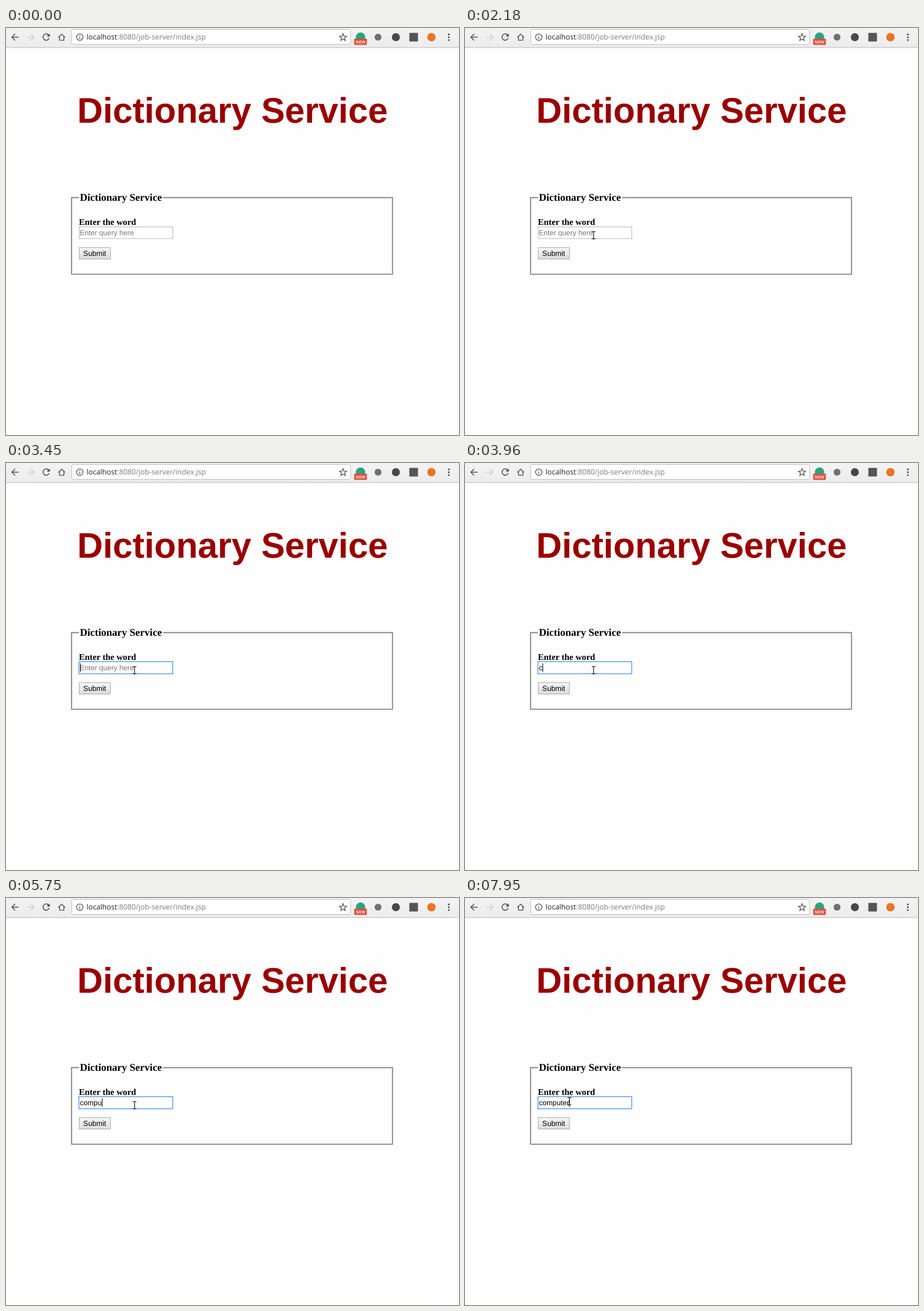
Write an HTML page that moves like this. It is 789 by 709 pixels and loops after 8000 ms.

```html
<!DOCTYPE html>
<html lang="en">
<head>
<meta charset="utf-8">
<title>Dictionary Service</title>
<style>
  html, body { margin: 0; width: 100%; height: 100%; overflow: hidden; background: #fefefe; }
  svg { display: block; }
  text { text-rendering: geometricPrecision; white-space: pre; }
  .sans { font-family: "Liberation Sans", Arial, sans-serif; }
  .serif { font-family: "Liberation Serif", "Times New Roman", serif; font-weight: bold; }
  .ui { font-family: "Open Sans", sans-serif; }
  .field { font-size: 12.66px; }
  .icon { fill: none; stroke: #505050; stroke-width: 1.6; }
</style>
</head>
<body>
<svg width="789" height="709" viewBox="0 0 789 709">
  <defs>
    <linearGradient id="bar" x2="0" y2="1">
      <stop stop-color="#f3f3f3"/><stop offset="1" stop-color="#ececec"/>
    </linearGradient>
    <linearGradient id="face" x2="0" y2="1">
      <stop stop-color="#f6f6f6"/><stop offset="1" stop-color="#dcdcdc"/>
    </linearGradient>
  </defs>

  <!-- browser toolbar -->
  <rect width="789" height="34" fill="url(#bar)"/>
  <rect y="33.5" width="789" height="1" fill="#b8b8b8"/>
  <g class="icon">
    <path d="M22 16H10.5M16 10.2L10.2 16L16 21.8"/>
    <path d="M37 16H48.5M43 10.2L48.8 16L43 21.8" stroke="#cfcfcf" style="stroke:#cfcfcf"/>
    <path d="M74.6 12.8A5.5 5.5 0 1 0 75.2 17.6"/>
    <path d="M76.4 9.6V14.9H71.1Z" style="fill:#505050;stroke:none"/>
    <path d="M91 16.6L97 10.8L103 16.6M93.3 15V21.4H100.7V15" stroke-width="1.4"/>
  </g>
  <rect x="114.5" y="2.5" width="485.500" height="26" rx="2.500" fill="#fff" stroke="#bdbdbd"/>
  <g class="icon" style="stroke-width:1.3">
    <circle cx="128.500" cy="16" r="5.600"/>
    <path d="M128.500 15.200V19.200M128.500 12.700V14.100"/>
    <path id="star"/>
  </g>
  <text class="ui" x="140.300" y="20.300" font-size="12.720" fill="#222">localhost<tspan fill="#7b7b7b">:8080/job-server/index.jsp</tspan></text>

  <!-- extension buttons -->
  <circle cx="617.500" cy="16" r="8.200" fill="#27a57f"/>
  <rect x="606.500" y="18.500" width="22" height="11" rx="1" fill="#dd4f3c"/>
  <text class="ui" x="617.500" y="26.800" font-size="7.200" font-weight="600" fill="#fff" text-anchor="middle">NEW</text>
  <circle cx="648" cy="16" r="6" fill="#707070"/>
  <circle cx="679" cy="16" r="7" fill="#484848"/>
  <rect x="702.500" y="8.500" width="15" height="15" rx="1" fill="#555"/>
  <circle cx="741" cy="16" r="7.300" fill="#ea7423"/>
  <g fill="#505050">
    <circle cx="771.300" cy="11.200" r="1.600"/>
    <circle cx="771.300" cy="16.100" r="1.600"/>
    <circle cx="771.300" cy="21" r="1.600"/>
  </g>

  <!-- page -->
  <text class="sans" x="394.500" y="165" font-size="62" font-weight="bold" fill="#990000" text-anchor="middle">Dictionary Service</text>
  <path d="M127 295.500H114.200V428.900H673.200V295.500H273.500" fill="none" stroke="#858585" stroke-width="1.900"/>
  <text class="serif" x="128.700" y="301" font-size="18.050">Dictionary Service</text>
  <text class="serif" x="127" y="342.500" font-size="15.380">Enter the word</text>
  <rect id="input" fill="#fff"/>
  <text id="hint" class="sans field" x="128.500" y="361" fill="#777">Enter query here</text>
  <text id="typed" class="sans field" x="128.700" y="361"></text>
  <rect id="caret" y="349" width="1" height="15"/>
  <rect x="127.500" y="382.500" width="54.500" height="20" fill="url(#face)" stroke="#aaa"/>
  <text class="sans" x="134.600" y="397" font-size="12.800">Submit</text>

  <!-- pointers -->
  <path id="arrow" d="M.6 .9V13L3.400 10.500L5.400 14.600L7.500 13.700L5.600 9.700H9.500Z" fill="#fff" stroke="#333" stroke-width="1"/>
  <path id="beam" d="M.8 .7H3.100L4 1.300L4.900 .7H7.200M4 1V13M.8 13.300H3.100L4 12.700L4.900 13.300H7.200" fill="none" stroke="#222" stroke-width="1.300"/>
</svg>
<script>
const LOOP = 8000;
const WORD = "computer";
const $ = id => document.getElementById(id);

// [start ms, pointer, x, y]
const pointerSteps = [
  [0, "", 0, 0],
  [700, "arrow", 473, 575],
  [930, "arrow", 375, 500],
  [1170, "arrow", 311, 444],
  [1440, "arrow", 247, 383],
  [1670, "arrow", 229, 369],
  [1950, "beam", 221, 355],
  [2180, "beam", 220, 354],
  [7950, "beam", 178, 347]
];
const focusAt = 2450;
const keyTimes = [3960, 4210, 4710, 5220, 5750, 6210, 6470, 6970];
const caretOff = [[2960, 3450], [7450, 7950]];

function setAttrs(el, attrs) {
  for (const name in attrs) el.setAttribute(name, attrs[name]);
}
function show(el, on) {
  el.style.display = on ? "" : "none";
}

function starPath(cx, cy, outer, inner) {
  const points = Array.from({ length: 10 }, (_, i) => {
    const r = i % 2 ? inner : outer, a = i * Math.PI / 5 - Math.PI / 2;
    return (cx + r * Math.cos(a)).toFixed(2) + " " + (cy + r * Math.sin(a)).toFixed(2);
  });
  return "M" + points.join("L") + "Z";
}

function drawPointer(t) {
  const [, kind, x, y] = pointerSteps.findLast(step => step[0] <= t);
  for (const id of ["arrow", "beam"]) {
    show($(id), id === kind);
    $(id).setAttribute("transform", `translate(${x} ${y})`);
  }
}

function drawField(t) {
  const focused = t >= focusAt;
  const count = keyTimes.filter(k => k <= t).length;
  setAttrs($("input"), focused
    ? { x: 127, y: 346.1, width: 163.4, height: 21.1, stroke: "#5b9cee", "stroke-width": 1.5 }
    : { x: 127.5, y: 346.5, width: 163, height: 20.3, stroke: "#b4b4b4", "stroke-width": 1 });
  show($("hint"), !count);
  $("typed").textContent = WORD.slice(0, count);
  const width = count ? $("typed").getComputedTextLength() : 0;
  $("caret").setAttribute("x", Math.floor(129 + width));
  show($("caret"), focused && !caretOff.some(([from, to]) => t >= from && t < to));
}

function draw(t) {
  drawPointer(t);
  drawField(t);
}

$("star").setAttribute("d", starPath(587, 16.4, 6.6, 2.8));
const start = performance.now();
function tick() {
  draw((performance.now() - start) % LOOP);
  requestAnimationFrame(tick);
}
tick();
</script>
</body>
</html>
```
